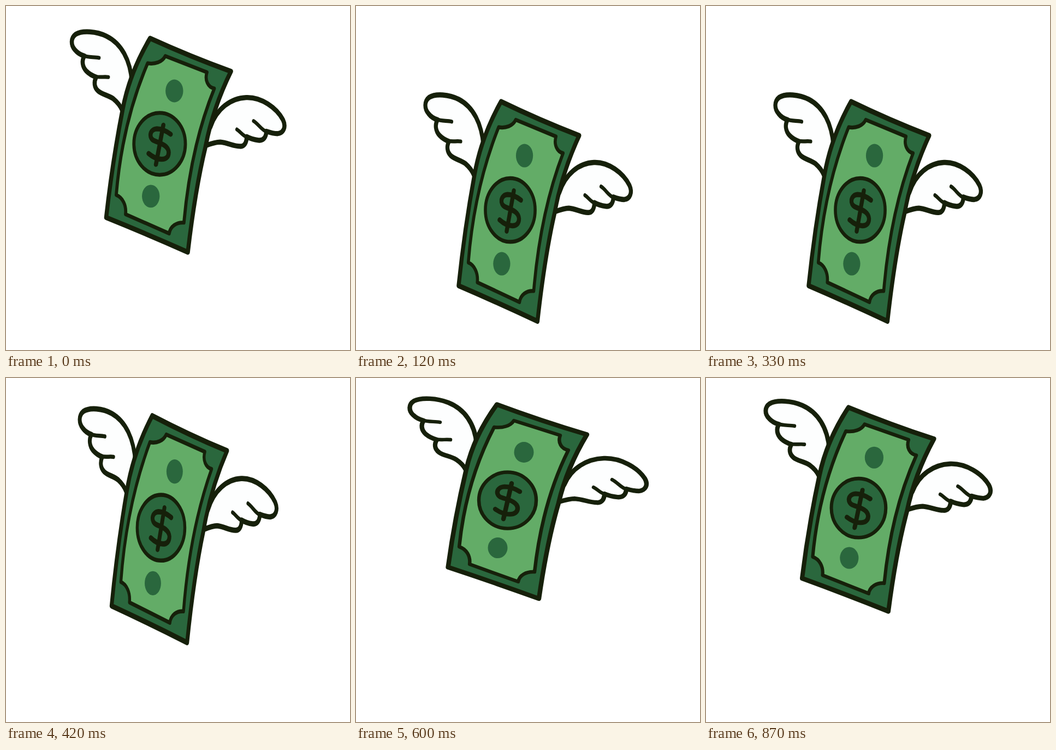
These frames come from a looping animation (630x630 px, 0.9 s). An HTML page:

```html
<!DOCTYPE html>
<html lang="en">
<head>
<meta charset="utf-8">
<title>Flying banknote</title>
<style>
  html, body { margin: 0; width: 100%; height: 100%; overflow: hidden; background: #fff; }
  svg { display: block; width: 100%; height: 100%; }
  .ink { stroke: #16200a; stroke-width: 6.4; stroke-linecap: round; stroke-linejoin: round; }
  .edge { stroke-width: 8.4; }
  .line { fill: none; }
  .wing { fill: #fdfefe; }
  .dark { fill: #2a673d; }
  .light { fill: #63ac67; }
</style>
</head>
<body>
<svg viewBox="0 0 630 630">
  <g id="note">
    <!-- wings -->
    <path class="ink edge wing" d="M221 122C218 84 199 57 169 45C149 37 120 35 106 42C96 48 96 60 105 68
      C110 73 116 76 124 78C118 86 120 96 128 103C134 108 141 111 148 113C143 121 144 130 152 136
      C160 142 173 143 183 149C192 155 197 160 201 168L240 160Z"/>
    <path class="ink line" d="M122 77C132 81 143 79 154 81M146 112C155 114 164 112 173 113"/>
    <path class="ink edge wing" d="M381 196C394 165 423 148 454 147C485 146 516 164 529 184
      C536 196 530 206 518 207C509 207 502 205 495 203C495 213 489 219 479 218C469 217 462 215 455 212
      C455 222 450 229 441 228C428 228 416 222 401 221C391 221 381 224 371 227L360 210Z"/>
    <path class="ink line" d="M496 204C485 201 479 191 469 186M457 213C447 211 443 204 435 200"/>
    <!-- bill -->
    <path class="ink edge dark" d="M258 48.500Q340 79 423 103.500Q386 165 371 229Q350 300 335 404
      Q252 374 168.500 346.500Q181 255 202 167Q216 106 258 48.500Z"/>
    <path class="ink light" d="M289 78L374 105C369 118 376 130 389 132Q341 228 327 355
      C312 354 299 361 297 373L208 341C210 326 202 313 189 309Q201 190 253 90C268 92 283 88 289 78Z"/>
    <ellipse class="dark" cx="307.500" cy="136" rx="18" ry="19"/>
    <ellipse class="dark" cx="259.500" cy="311" rx="18" ry="19"/>
    <ellipse class="ink dark" cx="277.500" cy="224" rx="52.500" ry="51.500"/>
    <path class="ink edge line" d="M300 208C290 202 281 199 272 199C256 200 255 215 267 219
      C278 223 295 226 296 238C296 254 272 252 255 240M285 193L270 258"/>
  </g>
</svg>
<script>
  const note = document.getElementById('note');
  const STEP = 30, STEPS = 30;
  const CX = 315.5, CY = 221, DROP = 225.4;

  function draw() {
    const k = Math.floor(performance.now() / STEP) % STEPS;
    const swing = Math.sin(2 * Math.PI * k / STEPS);
    const fall = ((1 + swing) / 2) ** 3;
    // Stretch while falling, squash at the lowest point.
    const squash = 0.95 * Math.max(0, swing) ** 2.85 - 0.815 * fall;
    note.setAttribute('transform',
      `translate(${CX} ${CY + DROP * fall}) scale(${1 + squash} ${1 - squash}) translate(${-CX} ${-CY})`);
    requestAnimationFrame(draw);
  }
  draw();
</script>
</body>
</html>
```
